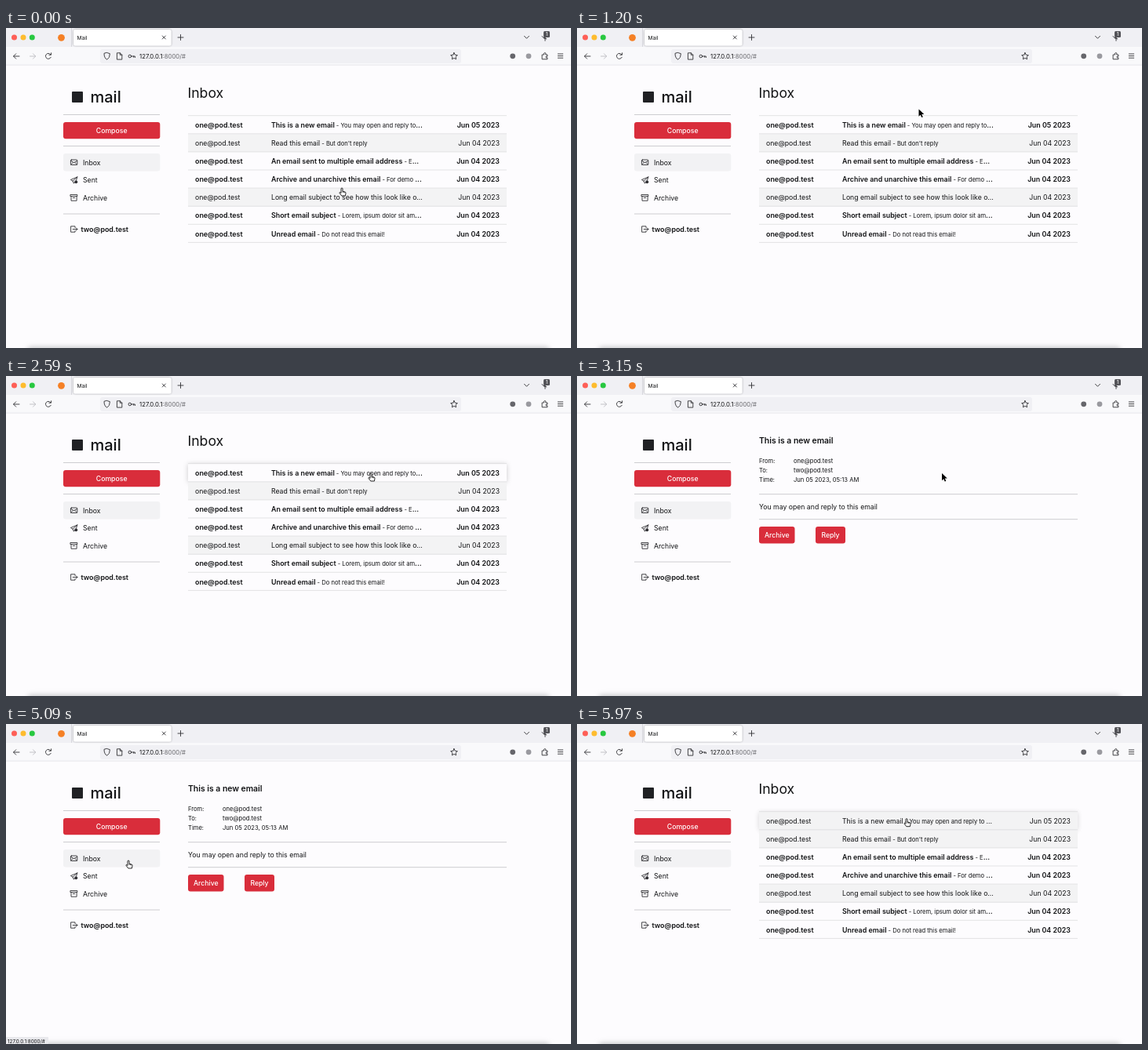
These frames come from a looping animation (720 by 408 pixels, 5990 ms). An HTML page:

```html
<!DOCTYPE html>
<html lang="en">
<head>
<meta charset="utf-8">
<title>Mail</title>
<style>
  html, body { margin: 0; width: 100%; height: 100%; overflow: hidden; background: #fdfcfe; }
  svg { display: block; width: 720px; height: 408px; font: 8.7px Inter, "Open Sans", sans-serif; fill: #111214; }
  .bold { font-weight: 600; font-size: 8.9px; }
  .title { font-weight: 600; font-size: 10.4px; }
  .small { font-size: 7.6px; font-weight: 400; }
  .logo { font-size: 20px; font-weight: 500; }
  .heading { font-size: 17.6px; }
  .line { fill: none; stroke: #303034; stroke-width: .9; stroke-linecap: round; stroke-linejoin: round; }
  .rule { fill: none; stroke: #cdcdd0; }
  .rows { stroke: #dcdcdf; stroke-width: .8; }
  .white { fill: #fff; }
</style>
</head>
<body>
<svg id="stage" viewBox="0 0 720 408"></svg>
<script>
const LOOP = 5990, OPEN = 2960, BACK = 5340;
const SENDER = 'one@pod.test', OWNER = 'two@pod.test';

const rect = (x, y, w, h, fill, rx = 0, extra = '') =>
  `<rect x="${x}" y="${y}" width="${w}" height="${h}" rx="${rx}" fill="${fill}" ${extra}/>`;
const dot = (x, y, r, fill) => `<circle cx="${x}" cy="${y}" r="${r}" fill="${fill}"/>`;
const text = (x, y, s, cls = '', extra = '') => `<text x="${x}" y="${y}" class="${cls}" ${extra}>${s}</text>`;
const line = (d, extra = '') => `<path class="line" d="${d}" ${extra}/>`;
const rule = (x1, x2, y, cls = '') => `<path class="rule ${cls}" d="M${x1} ${y}H${x2}"/>`;
const button = (x, y, w, h, label) => rect(x, y, w, h, '#d92d3b', 3) +
  text(x + w / 2, y + h / 2 + 3.1, label, 'white', 'text-anchor="middle" font-weight="500"');

// subject, preview, ending, date, already read
const mails = [
  ['This is a new email', 'You may open and reply to', '...', 'Jun 05 2023', false],
  ['Read this email', "But don't reply", '', 'Jun 04 2023', true],
  ['An email sent to multiple email address', 'E', '...', 'Jun 04 2023', false],
  ['Archive and unarchive this email', 'For demo ', '...', 'Jun 04 2023', false],
  ['Long email subject to see how this look like o...', '', '', 'Jun 04 2023', true],
  ['Short email subject', 'Lorem, ipsum dolor sit am', '...', 'Jun 04 2023', false],
  ['Unread email', 'Do not read this email!', '', 'Jun 04 2023', false]
];
const rowY = i => 112 + i * 23.1;

function mailRow([subject, preview, ending, date, read], i) {
  const y = rowY(i), base = y + 14.9, cls = read ? '' : 'bold';
  const snippet = preview && `<tspan class="small"> - ${preview}</tspan>${ending}`;
  return rect(232, y, 406, 23.1, read ? '#f3f3f4' : '#fdfcfe') +
    text(241, base, SENDER, cls) + text(338, base, subject + snippet, cls, 'xml:space="preserve"') +
    text(629, base, date, cls, 'text-anchor="end"');
}

const browser = () => rect(0, 0, 720, 24, '#f0f0f4') + rect(0, 24, 720, 23, '#f9f9fb') +
  rect(0, 46.7, 720, .8, '#e2e2e6') +
  dot(10.5, 12, 3.5, '#fe5f57') + dot(22, 12, 3.5, '#febc2e') + dot(33.3, 12, 3.5, '#28c840') +
  dot(70.5, 12.3, 4.4, '#f58025') + rect(83, 0, .8, 24, '#d0d0d6') +
  rect(86, 2, 124.5, 20.5, '#fff', 2.5, 'filter="url(#tabShadow)"') +
  text(90.5, 14.6, 'Mail', '', 'font-size="6.6"') +
  line('M199.3 10l4 4m0-4l-4 4M219 12h7m-3.5-3.5v7') +
  line('M660.5 10.3l3 3 3-3') +
  line('M683 10.5q1.2 2.5 4 2.3m0-1.5v5m-1.8-3.5l3.5 1') + rect(685, 4, 8, 8, '#55555a', 1.5) +
  text(689, 10.4, '1', 'white', 'font-size="6.5" text-anchor="middle"') +
  line('M17 36h-7.3m3-3.2l-3.2 3.2 3.2 3.2') +
  line('M30.5 36h7m-3-3.2l3.2 3.2-3.2 3.2', 'style="stroke:#bbbbc0"') +
  line('M57.2 37.3a3.5 3.5 0 1 1-.6-3.8m.9-1.7v2.5h-2.6') +
  rect(120, 27, 460, 18, '#f0f0f4', 3) +
  line('M128.7 31.5l3.7 1.2q0 5.7-3.7 7.5-3.7-1.8-3.7-7.5z') +
  line('M141.8 31.8h3.5l2.5 2.5v5.8h-6zm3.5 0v2.5h2.5') +
  line('M159.4 36h5v1.6m-1.8-1.6v1.3') + '<circle class="line" cx="157.8" cy="36" r="1.8"/>' +
  text(170, 38.7, '127.0.0.1<tspan fill="#66666b">:8000/#</tspan>', '', 'font-size="7.75"') +
  line('M571 31.5l1.3 2.8 3 .4-2.2 2.1.5 3-2.6-1.4-2.6 1.4.5-3-2.2-2.1 3-.4z') +
  dot(645.7, 35.8, 3.4, '#66666b') + dot(666, 35.8, 3.4, '#9a9a9f') +
  line('M683.5 34h2.2q-.8-2.5 1-2.5t1 2.5h2.2v2.2q-2-.7-2 .8t2 .8v2h-6.4z') +
  line('M703.3 33h6.4m-6.4 2.6h6.4m-6.4 2.6h6.4');

const sidebar = () => rect(84, 81, 14, 14, '#202124', 1) +
  text(107.5, 94.8, 'mail', 'logo') +
  [110.5, 150.5, 237].map(y => rule(73, 196, y)).join('') +
  button(73, 120, 123.3, 21.3, 'Compose') + rect(73, 160, 123.3, 22.5, '#f2f2f4', 3) +
  ['Inbox', 'Sent', 'Archive'].map((s, i) => text(98, 174.6 + i * 22.6, s)).join('') +
  line('M83.4 168h6.4q1 0 1 1v4.5q0 1-1 1h-6.4q-1 0-1-1v-4.5q0-1 1-1zm-.8 1.3l4 2.5 4-2.5m-8 5l3-3m5 3l-3-3') +
  line('M90.8 190l-8.4 3.5 2.7 1.6 1.3 3.1 1-1.7m3.4-6.5l-1.2 4m1.2-4l-5.7 5.1') +
  dot(89.2, 196.2, 2, '#303034') +
  line('M82.3 212.5h8.5v2h-8.5zm.7 2v5.7h7.1v-5.7m-4.8 2h2.5') +
  line('M88 254.5v-1.7h-5.4v7.4H88v-1.7m-2.8-2h5.8m-1.8-1.8l1.8 1.8-1.8 1.8') +
  text(95.5, 259.7, OWNER, 'bold');

// The rows after the first cover the lower part of its hover shadow.
const inbox = () => text(231.5, 89.4, 'Inbox', 'heading') +
  `<g id="hover">${rect(232, 112, 406, 23, '#fff', 0, 'filter="url(#rowShadow)"')}</g>` +
  `<g id="unread">${mailRow(mails[0], 0)}</g>` +
  `<g id="read">${mailRow(['This is a new email', 'You may open and reply to ', '...', 'Jun 05 2023', true], 0)}</g>` +
  mails.slice(1).map((mail, i) => mailRow(mail, i + 1)).join('') +
  Array.from({ length: 8 }, (_, i) => rule(232, 638, rowY(i) - .3, 'rows')).join('');

const message = () => text(232, 85.7, 'This is a new email', 'title') +
  [['From:', SENDER], ['To:', OWNER], ['Time:', 'Jun 05 2023, 05:13 AM']].map(([k, v], i) =>
    text(232, 110.5 + i * 12, k, 'small') + text(276, 110.5 + i * 12, v, 'small')).join('') +
  rule(232, 638, 150.7) + text(232, 170.2, 'You may open and reply to this email') + rule(232, 638, 182.7) +
  button(232, 192, 45.5, 21.5, 'Archive') + button(304, 192, 38, 21.5, 'Reply');

document.getElementById('stage').innerHTML = `
  <defs>
    <filter id="tabShadow" x="-10%" y="-30%" width="120%" height="160%">
      <feDropShadow dx="0" dy="0" stdDeviation=".9" flood-opacity=".4"/></filter>
    <filter id="rowShadow" x="-5%" y="-70%" width="110%" height="240%">
      <feDropShadow dx="0" dy=".5" stdDeviation="3" flood-opacity=".2"/></filter>
    <filter id="blur" x="-5%" y="-200%" width="110%" height="500%"><feGaussianBlur stdDeviation="3"/></filter>
  </defs>
  ${rect(0, 0, 720, 408, '#fdfcfe')}
  ${rect(28, 406.5, 664, 8, '#c8c8ca', 3, 'filter="url(#blur)"')}
  ${browser()}${sidebar()}
  <g id="inbox">${inbox()}</g>
  <g id="message">${message()}</g>
  <g id="status">${rect(0, 399, 54, 9, '#e9e9ed', 1)}${text(2, 406.6, '127.0.0.1:8000/#', '', 'font-size="6.3"')}</g>
  <g id="cursor" stroke-linejoin="round">
    <path id="arrow" d="M0 0V9.2l2.2-2 1.5 3.4 1.6-.7-1.5-3.3h3z" fill="#000" stroke="#fff" stroke-width=".8" paint-order="stroke"/>
    <g id="hand"><path d="M-1 1q0-1 1-1t1 1v3.2l3 .8q1.2.4 1 1.6l-.6 3.4h-4.6l-2.8-3.6q-.3-1 .8-.9l1.2 1z" fill="#fff" stroke="#111" stroke-width=".9"/>
      <path d="M1 4v2m1.5-1.5v1.7m1.4-1.2v1.4" fill="none" stroke="#111" stroke-width=".6"/></g>
  </g>`;

const parts = Object.fromEntries([...document.querySelectorAll('#stage g[id], #arrow')].map(el => [el.id, el]));
const show = (name, on) => parts[name].setAttribute('opacity', Number(on));

const clamp = v => Math.min(1, Math.max(0, v));
const ramp = (t, from, to) => { const p = clamp((t - from) / (to - from)); return p * p * (3 - 2 * p); };

// time, x, y of the pointer tip
const path = [
  [0, 428, 204], [280, 424, 31], [560, 434.5, 77.5], [610, 436, 83.5], [640, 436, 83.5],
  [770, 437, 98], [1040, 437, 98], [1200, 435.5, 103.5], [1490, 435.5, 103.5],
  [1890, 450.5, 118], [2080, 450.5, 118], [2450, 464.5, 123.5], [2580, 464.5, 123.5],
  [2590, 465, 124], [3520, 465, 124], [3950, 482, 230], [4430, 482, 230],
  [4880, 190, 161], [5010, 156.5, 174], [5090, 156, 174], [5340, 156, 174],
  [5920, 420, 120], [5970, 420, 120.7]
];

function pointer(t) {
  const i = path.findIndex(k => k[0] > t);
  if (i < 0) return path.at(-1).slice(1);
  const [a, b] = [path[i - 1], path[i]], p = ramp(t, a[0], b[0]);
  return [a[1] + (b[1] - a[1]) * p, a[2] + (b[2] - a[2]) * p];
}

function render(t) {
  const [x, y] = pointer(t), listed = t < OPEN || t >= BACK, returned = t >= BACK;
  const overList = listed && x > 232 && x < 638 && y > 111 && y < 274;
  const overMenu = x > 73 && x < 196 && y > 160 && y < 228;
  show('inbox', listed);
  show('message', !listed);
  show('unread', !returned);
  show('read', returned);
  show('hover', returned ? ramp(t, 5820, 6040) : ramp(t, 2080, 2400));
  show('status', ramp(t, 4960, 5070) * (1 - ramp(t, 5420, 5500)));
  show('hand', overList || overMenu);
  show('arrow', !(overList || overMenu));
  parts.cursor.setAttribute('transform', `translate(${x} ${y})`);
}

const start = performance.now();
function tick() {
  render((performance.now() - start) % LOOP);
  requestAnimationFrame(tick);
}
tick();
</script>
</body>
</html>
```
